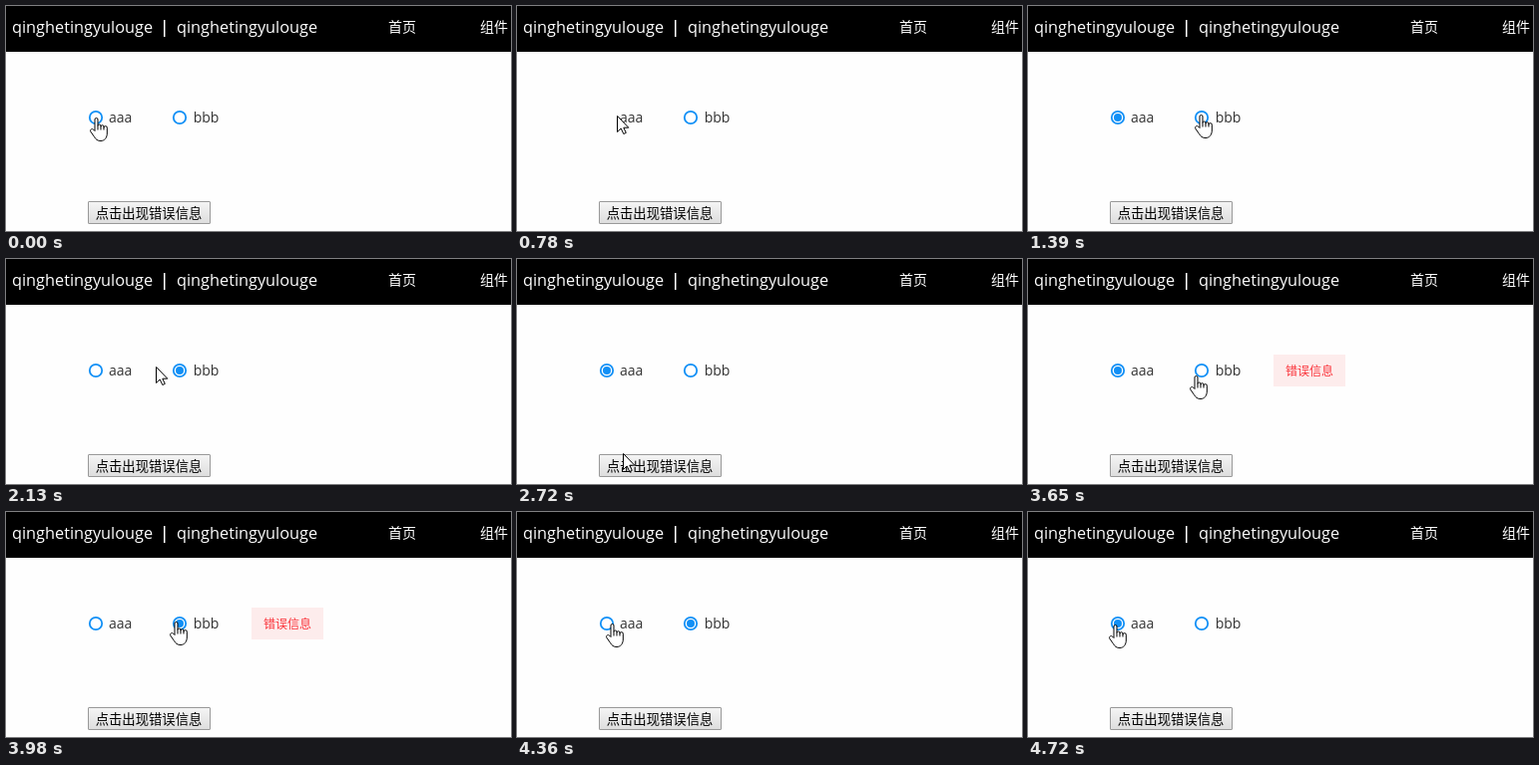
These frames come from a looping animation (506 by 226 pixels, 5410 ms). An HTML page:

```html
<!DOCTYPE html>
<html lang="zh">
<head>
<meta charset="utf-8">
<style>
  html, body { margin: 0; width: 100%; height: 100%; overflow: hidden; background: #fefefe; }
  svg { display: block; width: 506px; height: 226px; }
  text { font-family: "Open Sans", "Noto Sans CJK SC", "Noto Sans CJK", sans-serif; white-space: pre; }
  .nav { fill: #fff; font-size: 14px; font-weight: 500; }
  .brand { fill: #fff; font-size: 16.3px; font-weight: 500; }
  .label { fill: #333; font-size: 14px; }
  .ring { fill: #fff; stroke: #1290f6; stroke-width: 1.8; }
  .dot { fill: #1290f6; }
  .cursor { fill: #fff; stroke: #000; stroke-linejoin: round; }
</style>
</head>
<body>
<svg viewBox="0 0 506 226">
  <defs>
    <linearGradient id="raised" x2="0" y2="1">
      <stop stop-color="#f5f5f5"/><stop offset="1" stop-color="#ddd"/>
    </linearGradient>
    <linearGradient id="pressed" x2="0" y2="1">
      <stop stop-color="#ddd"/><stop offset="1" stop-color="#f5f5f5"/>
    </linearGradient>
  </defs>

  <rect width="506" height="46"/>
  <text class="brand" x="6" y="27">qinghetingyulouge</text>
  <rect x="158" y="14" width="1.5" height="17" fill="#fff"/>
  <text class="brand" x="171" y="27">qinghetingyulouge</text>
  <text class="nav" x="383" y="26">首页</text>
  <text class="nav" x="475" y="26">组件</text>

  <g id="radioA">
    <circle class="ring" cx="90" cy="112" r="6.2"/>
    <circle class="dot" id="dotA" cx="90" cy="112" r="4"/>
  </g>
  <text class="label" x="103" y="117">aaa</text>
  <circle class="ring" cx="174" cy="112" r="6.2"/>
  <circle class="dot" id="dotB" cx="174" cy="112" r="4"/>
  <text class="label" x="187.7" y="117">bbb</text>

  <g id="error">
    <rect x="246" y="96" width="72" height="32" fill="#fdecec"/>
    <text x="258" y="116.5" font-size="12" fill="#fa3239">错误信息</text>
  </g>

  <rect id="button" x="82.5" y="196.5" width="122" height="22" rx=".5" stroke="#999"/>
  <text x="89.7" y="213" font-size="13.333">点击出现错误信息</text>

  <path id="arrow" class="cursor" d="M.5.5V16.5L4.2 13 6.8 18.5 9.3 17.4 6.8 12.2H11.8Z"/>
  <path id="hand" class="cursor" d="M-1 13.5V2a1.5 1.5 0 0 1 3 0V8.5a1.5 1.5 0 0 1 3 0V9.2a1.5 1.5 0 0 1 3 0V10.2a1.6 1.5 0 0 1 3.3 0V16C11.3 20.5 8.5 23.5 5 23.5S0 22-1.5 19.5L-5.3 14C-6 12.3-3.8 10.6-2.5 12ZM2 8.5v4M5 9v3.5M8 10v2.5"/>
  <g id="press" fill="none">
    <circle r="10.5" stroke="#000"/>
    <circle r="9.5" stroke="#fff"/>
  </g>
</svg>
<script>
const LOOP = 5410, STEP = 50, PRESS = 80;
const $ = id => document.getElementById(id);

const home = { x: 90, y: 112 };
// The pointer reaches (x, y) in some steps of 50 ms, then rests there
const moves = [
  { at: 780, steps: 1, x: 100, y: 110 },
  { at: 830, steps: 3, x: 185, y: 110 },
  { at: 1240, steps: 6, x: 169, y: 108 },
  { at: 2130, steps: 1, x: 150, y: 108 },
  { at: 2180, steps: 2, x: 91, y: 108 },
  { at: 2520, steps: 5, x: 106, y: 195 },
  { at: 2770, steps: 2, x: 109, y: 207 },
  { at: 3470, steps: 4, x: 168, y: 117 },
  { at: 3670, steps: 3, x: 170, y: 110 },
  { at: 4130, steps: 5, x: 95, y: 112 },
  { at: 4390, steps: 5, x: 87, y: 113 }
];
const clicks = [
  { at: 500, on: 'A' }, { at: 1620, on: 'B' }, { at: 2320, on: 'A' },
  { at: 2950, on: 'button' }, { at: 3900, on: 'B' }, { at: 4640, on: 'A' }
];
const [errorIn, errorOut] = [3030, 4080];

const clamp = v => Math.max(0, Math.min(1, v));
const smooth = p => p * p * (3 - 2 * p);
const show = (id, on) => $(id).setAttribute('visibility', on ? 'inherit' : 'hidden');

function pointerAt(t) {
  let { x, y } = home;
  for (const move of moves) {
    if (t < move.at) break;
    const p = smooth(clamp((Math.floor((t - move.at) / STEP) + 1) / move.steps));
    x += (move.x - x) * p;
    y += (move.y - y) * p;
  }
  return [Math.round(x), Math.round(y)];
}

function draw(t) {
  const [x, y] = pointerAt(t);
  const click = clicks.find(c => t >= c.at && t < c.at + PRESS);
  const checked = clicks.findLast(c => c.on !== 'button' && t >= c.at + PRESS)?.on;
  const overRadio = [90, 174].some(cx => Math.abs(x - cx) <= 7 && Math.abs(y - 112) <= 7);

  for (const id of ['arrow', 'hand', 'press']) $(id).setAttribute('transform', `translate(${x} ${y})`);
  show('hand', overRadio);
  show('arrow', !overRadio);
  show('press', click);

  // The first radio blinks once as the pointer leaves it
  show('radioA', t < 780 || t >= 830);
  show('dotA', checked === 'A');
  show('dotB', checked === 'B');

  $('button').setAttribute('fill', `url(#${click?.on === 'button' ? 'pressed' : 'raised'})`);
  $('error').setAttribute('opacity', clamp((t - errorIn) / 210) * clamp(1 - (t - errorOut) / 250));
}

const start = performance.now();
function tick() {
  draw((performance.now() - start) % LOOP);
  requestAnimationFrame(tick);
}
tick();
</script>
</body>
</html>
```
